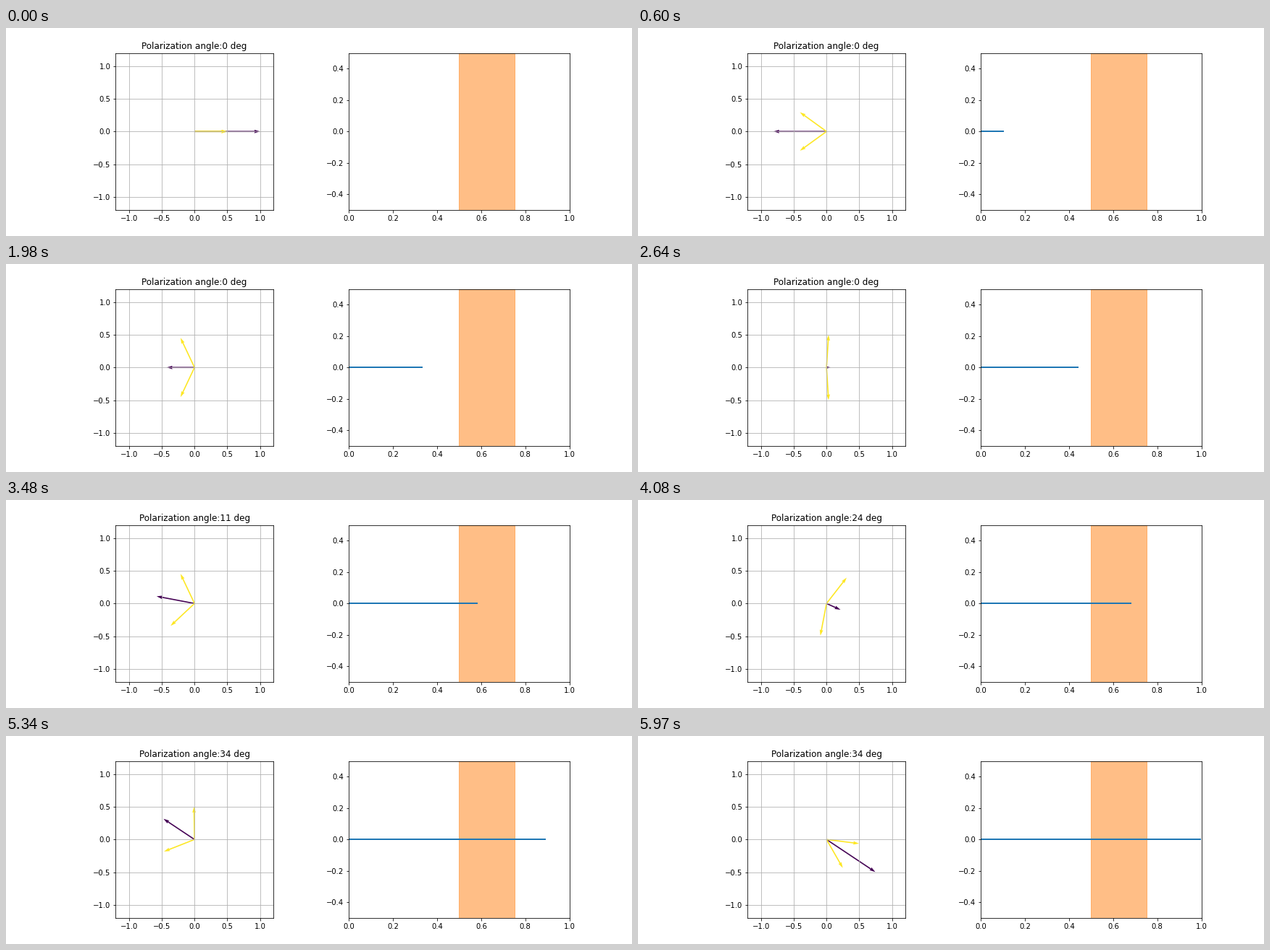
Recreate the animation shown at these times as a matplotlib script. Size 864 px wide and 288 px high, loop 6000 ms.

```python
import numpy as np
import matplotlib.pyplot as plt
from matplotlib.animation import FuncAnimation

FRAMES = 200
INTERVAL = 30
WAVES = 4                  # wavelengths across the path
START, END = 0.5, 0.75     # rotating medium
EXTRA_WAVES = 0.75         # added wavenumber of the right-handed part

PURPLE, YELLOW = "#440154", "#fde725"

fig, (vec_ax, path_ax) = plt.subplots(1, 2, figsize=(12, 4), dpi=72)
fig.subplots_adjust(left=0.125, right=0.9, bottom=0.125, top=0.88, wspace=0.2)

vec_ax.set_aspect("equal")
vec_ax.set(xlim=(-1.2, 1.2), ylim=(-1.2, 1.2))
ticks = np.arange(-1, 1.1, 0.5)
vec_ax.set_xticks(ticks)
vec_ax.set_yticks(ticks)
vec_ax.grid(True)
title = vec_ax.set_title("")

path_ax.set(xlim=(0, 1), ylim=(-0.5, 0.5))
path_ax.axvspan(START, END, color="C1", alpha=0.5)
beam, = path_ax.plot([], [], lw=2)


def field(z):
    """Sum and circular parts of the field at z, with the rotation in degrees."""
    phase = 2 * np.pi * WAVES * z
    delay = 2 * np.pi * EXTRA_WAVES * (np.clip(z, START, END) - START)
    left = 0.5 * np.exp(1j * phase)
    right = 0.5 * np.exp(-1j * (phase + delay))
    return np.array([left + right, left, right]), np.degrees(delay / 2)


vectors, _ = field(0)
arrows = vec_ax.quiver(np.zeros(3), np.zeros(3), vectors.real, vectors.imag,
                       color=[PURPLE, YELLOW, YELLOW],
                       angles="xy", scale_units="xy", scale=1)


def update(i):
    z = i / FRAMES
    vectors, angle = field(z)
    arrows.set_UVC(vectors.real, vectors.imag)
    beam.set_data([0, z] if i else [], [0, 0] if i else [])
    title.set_text(f"Polarization angle:{angle:.0f} deg")
    return arrows, beam, title


anim = FuncAnimation(fig, update, frames=FRAMES, interval=INTERVAL,
                     repeat=True, repeat_delay=0, blit=False)
plt.show()
```
